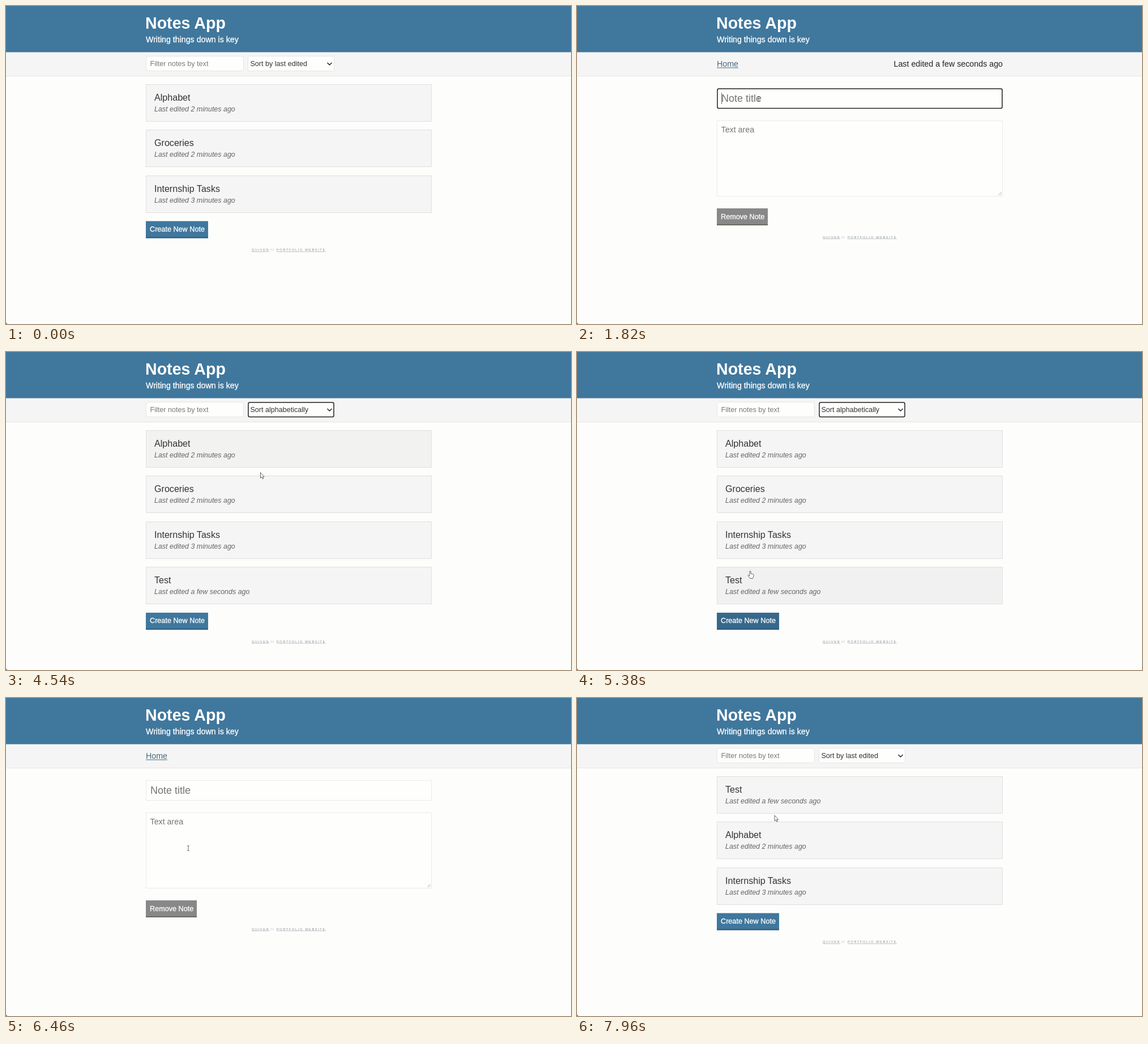
Recreate the animation shown at these times as an HTML page. Size 998 px wide and 561 px high, loop 8000 ms.

```html
<!DOCTYPE html>
<html lang="en">
<head>
<meta charset="utf-8">
<title>Notes App</title>
<style>
  html, body { margin: 0; width: 100%; height: 100%; overflow: hidden; background: #fdfdfc; }
  svg { display: block; width: 100%; height: 100%; font-family: "Liberation Sans", Arial, sans-serif; }
  text { white-space: pre; }
  .tiny { letter-spacing: 1.58px; }
  .light { stroke: #fff; stroke-width: .3px; }
</style>
</head>
<body>
<svg id="stage" viewBox="0 0 998 561"></svg>
<script>
const LOOP = 8000;
const CARD_FADE = 160;
const BUTTON_FADE = 480;
const BLUE = '#40779d';
const SECONDS = 'Last edited a few seconds ago';
const MINUTES = n => `Last edited ${n} minutes ago`;

const NOTES = {
  unnamed: ['Unnamed note', SECONDS],
  test: ['Test', SECONDS],
  alphabet: ['Alphabet', MINUTES(2)],
  groceries: ['Groceries', MINUTES(2)],
  tasks: ['Internship Tasks', MINUTES(3)]
};
const SORTS = ['Sort by last edited', 'Sort by recently created', 'Sort alphabetically'];

const SCENES = [
  { at: 0, list: 'alphabet groceries tasks' },
  { at: 1120, list: 'unnamed alphabet groceries tasks' },
  { at: 1220, blank: true },
  { at: 1280, edited: SECONDS, typing: true },
  { at: 2620, list: 'test alphabet groceries tasks' },
  { at: 3820, list: 'alphabet groceries tasks test', sort: 2 },
  { at: 5540, blank: true },
  { at: 5600, title: 'Test', edited: SECONDS },
  { at: 6060, list: 'test alphabet groceries tasks' },
  { at: 6440, blank: true },
  { at: 6520, title: 'Groceries', body: ['Milk', 'Eggs', 'Bread'], edited: MINUTES(2) },
  { at: 7500, list: 'test alphabet tasks' }
];
SCENES.forEach(s => { if (s.list) s.cards = s.list.split(' ').map(id => NOTES[id]); });

const FOCUS_AT = 1740;
const KEYS = [1980, 2090, 2190, 2300];
const POPUP = [3360, 3820];

// time, x, y
const PATH = [
  [240, 420, 561], [860, 300, 394], [1280, 300, 394], [1660, 321, 164],
  [2340, 321, 164], [2560, 266, 102], [2720, 266, 102], [3060, 480, 119],
  [3240, 500, 103], [3440, 500, 103], [3700, 458, 155], [4380, 455, 170],
  [4540, 449.5, 212.5], [4900, 330, 478], [5200, 304, 468], [5380, 306, 386],
  [5640, 306, 388], [5960, 266, 102], [6120, 266, 102], [6360, 322, 265],
  [6640, 322, 265], [7000, 312, 440], [7340, 296, 372], [7520, 296, 372],
  [7780, 349, 207], [8000, 349, 207]
];

const ease = k => k * k * (3 - 2 * k);
const inside = (p, [x, y, w, h]) => p.x >= x && p.x <= x + w && p.y >= y && p.y <= y + h;
const sceneAt = t => SCENES.findLast(s => s.at <= t);

function cursorAt(t) {
  const i = PATH.findIndex(p => p[0] > t);
  if (i < 1) return { x: -50, y: -50 };
  const [a, b] = [PATH[i - 1], PATH[i]];
  const k = ease((t - a[0]) / (b[0] - a[0]));
  return { x: a[1] + (b[1] - a[1]) * k, y: a[2] + (b[2] - a[2]) * k };
}

// Fraction of the fade window spent over the box
function hoverAmount(box, t, start, fade) {
  const steps = 12;
  let hits = 0;
  for (let i = 0; i < steps; i++) {
    const at = t - i * fade / steps;
    const open = at >= POPUP[0] && at < POPUP[1];
    if (at >= start && !open && inside(cursorAt(at), box)) hits++;
  }
  return hits / steps;
}

function mix(from, to, k) {
  return `rgb(${from.map((c, i) => Math.round(c + (to[i] - c) * k))})`;
}

const text = (x, y, size, fill, str, attrs = '') =>
  `<text x="${x}" y="${y}" font-size="${size}" fill="${fill}" ${attrs}>${str}</text>`;
const rect = (x, y, w, h, fill, attrs = '') =>
  `<rect x="${x}" y="${y}" width="${w}" height="${h}" fill="${fill}" ${attrs}/>`;
const framed = ([x, y, w, h], fill, stroke, r = 0) =>
  rect(x + .5, y + .5, w - 1, h - 1, fill, `stroke="${stroke}" rx="${r}"`);
const focusRing = ([x, y, w, h]) =>
  rect(x + 1, y + 1, w - 2, h - 1.6, 'none', 'stroke="#222" stroke-width="1.5" rx="2.5"');

const FILTER = [247, 88, 173, 27];
const SELECT = [427, 88, 153, 27];
const HOME = [247, 94, 38, 16];
const TITLE = [247, 145, 505, 36];
const AREA = [247, 202, 505, 134];
const REMOVE = [247, 357, 90, 30];
const cardBox = i => [247, Math.round(138 + 80.4 * i), 505, 66];
const createBox = n => [247, 138.3 + 80.4 * n, 110, 30];

function header() {
  return rect(0, 81, 998, 42, '#f5f5f5') + rect(0, 123, 998, 1, '#e6e6e3') +
    rect(0, 0, 998, 81.5, BLUE) +
    text(246, 40, 28.6, '#fff', 'Notes App', 'font-weight="bold"') +
    text(247, 63.6, 14.2, '#fff', 'Writing things down is key', 'class="light"') +
    '<path d="M0 558.5v2.5h2.5z" fill="#666"/>';
}

function footer(y) {
  const line = (x, w) => rect(x, y + 1, w, .7, '#a3abb0');
  const word = (x, str) => text(x, y, 5.7, '#868e94', str, 'class="tiny"');
  return word(434, 'QUIVEN') + line(434, 31) + word(467.5, '//') +
    word(478, 'PORTFOLIO WEBSITE') + line(478, 87);
}

function button([x, y, w, h], label, fill, edge) {
  return rect(x, y, w, h, fill) + rect(x, y + h - 2, w, 2, edge) +
    text(x + 7, y + 18.5, 12.65, '#fff', label, 'class="light"');
}

function popup(p) {
  const row = Math.max(0, Math.min(2, Math.floor((p.y - 116) / 16)));
  return framed([427, 115, 153, 50], '#fff', '#888') + SORTS.map((s, i) =>
    (i === row ? rect(428, 116 + 16 * i, 151, 16, '#1967d2') : '') +
    text(431, 128.5 + 16 * i, 12.6, i === row ? '#fff' : '#222', s)).join('');
}

function homePage(s, t, p) {
  const open = t >= POPUP[0] && t < POPUP[1];
  const create = createBox(s.cards.length);
  let out = framed(FILTER, '#fefefd', '#e6e6e4', 4) +
    text(254.5, 106.4, 12.6, '#7a7a7a', 'Filter notes by text') +
    framed(SELECT, '#fefefd', '#e6e6e4', 1) +
    text(431.5, 106.4, 12.55, '#333', SORTS[s.sort || 0]) +
    '<path d="M567.5 100l4 4 4-4" fill="none" stroke="#222" stroke-width="1.5"/>';
  if (open || s.sort) out += focusRing(SELECT);
  s.cards.forEach(([title, edited], i) => {
    const box = cardBox(i), y = box[1];
    const k = hoverAmount(box, t, s.at, CARD_FADE);
    out += framed(box, mix([245, 245, 245], [240, 240, 239], k), '#e0e0df') +
      text(262, y + 28.6, 16.1, '#333', title) +
      text(262, y + 47.8, 12.48, '#666', edited, 'font-style="italic"');
  });
  const k = hoverAmount(create, t, s.at, BUTTON_FADE);
  out += button(create, 'Create New Note', mix([64, 119, 157], [50, 97, 130], k),
    mix([47, 92, 126], [46, 90, 122], k)) + footer(create[1] + 52.7);
  return out + (open ? popup(p) : '');
}

function editPage(s, t) {
  const focused = s.typing && t >= FOCUS_AT;
  const title = s.typing ? 'Test'.slice(0, KEYS.filter(k => k <= t).length) : s.title;
  let out = text(247, 107, 14.25, '#46687d', 'Home') + rect(247, 108.5, 38, 1, '#46687d');
  if (s.edited) out += text(752, 107, 14.25, '#222', s.edited, 'text-anchor="end"');
  out += framed(TITLE, '#fefefd', '#ebebe4') + (focused ? focusRing(TITLE) : '') +
    text(255, 168.5, 18, title ? '#222' : '#757575', title || 'Note title');
  if (focused && (t - FOCUS_AT) % 1000 < 500) {
    const width = [0, 11, 21, 30, 35][title.length];
    out += rect(255 + width, 153, .8, 20, '#444');
  }
  out += framed(AREA, '#fefefd', '#ebebe4') +
    '<path d="M744.5 333.5l5-5M747.5 333.5l2-2" stroke="#999" stroke-width=".8"/>';
  out += s.body
    ? s.body.map((l, i) => text(254.5, 223 + 16.5 * i, 14.25, '#222', l)).join('')
    : text(254.5, 223, 14.25, '#757575', 'Text area');
  const k = hoverAmount(REMOVE, t, s.at, BUTTON_FADE);
  return out + button(REMOVE, 'Remove Note', mix([136, 136, 136], [118, 118, 118], k), '#6c6c62') +
    footer(409.5);
}

const POINTERS = {
  arrow: '<path d="M0 0v10l2.2-2 1.6 3.4 1.5-.7-1.5-3.2h2.9z"/>',
  hand: '<path d="M-1 1q1-1.6 2 0v4l4.2 1q1.2.4 1 1.8l-.8 3.4-1 2.3h-4.6l-3.4-4.6q-.6-1.5.8-1.4l1.8 1.4z"/>',
  beam: '<path d="M-2-4.5q2 0 2 1v7q0 1-2 1M2-4.5q-2 0-2 1M2 4.5q-2 0-2-1" fill="none"/>'
};

function pointerKind(s, t, p) {
  if (t >= POPUP[0] && t < POPUP[1]) return 'arrow';
  const hands = s.cards
    ? [...s.cards.map((_, i) => cardBox(i)), createBox(s.cards.length)]
    : [HOME, REMOVE];
  const beams = s.cards ? [FILTER] : [TITLE, AREA];
  if (hands.some(b => inside(p, b))) return 'hand';
  return beams.some(b => inside(p, b)) ? 'beam' : 'arrow';
}

function pointer(s, t, p) {
  return `<g transform="translate(${p.x} ${p.y})" fill="#fff" stroke="#555" stroke-width=".9"
    stroke-linejoin="round">${POINTERS[pointerKind(s, t, p)]}</g>`;
}

const stage = document.getElementById('stage');
const began = performance.now();

function draw() {
  const t = (performance.now() - began) % LOOP;
  const s = sceneAt(t), p = cursorAt(t);
  stage.innerHTML = rect(0, 0, 998, 561, '#fdfdfc') + header() +
    (s.cards ? homePage(s, t, p) : editPage(s, t)) + pointer(s, t, p);
  requestAnimationFrame(draw);
}
draw();
</script>
</body>
</html>
```
